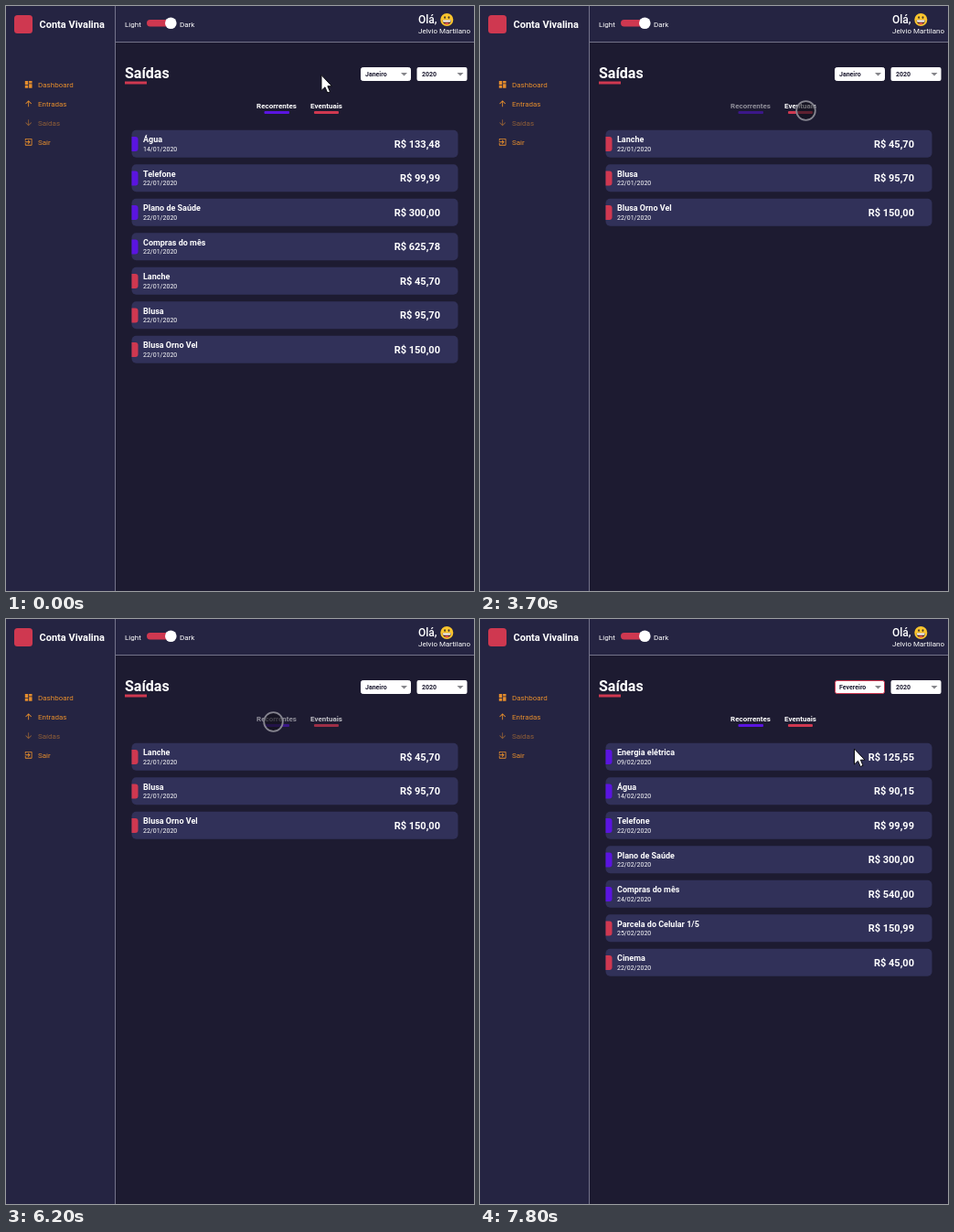
These frames come from a looping animation (512x640 px, 8 s). An HTML page:

```html
<!DOCTYPE html>
<html lang="pt-BR">
<head>
<meta charset="utf-8">
<title>Saídas</title>
<style>
html, body { margin: 0; width: 100%; height: 100%; overflow: hidden; background: #1d1b31; }
svg { display: block; width: 512px; height: 640px; font: 8px Roboto, sans-serif; fill: #fff; }
.b { font-weight: 700; }
.menu { fill: #e58d2c; }
.red { fill: #cf3850; }
.violet { fill: #5a14e0; }
.card { fill: #313159; }
.name { font: 700 9px Roboto, sans-serif; }
.date { font-size: 7px; }
.price { font: 700 11px Roboto, sans-serif; text-anchor: end; }
.select { font: 700 7px Roboto, sans-serif; fill: #1d1b31; }
.month { font: 500 14px Roboto, sans-serif; fill: #26253a; }
.tag { font-weight: 700; text-anchor: middle; }
</style>
</head>
<body>
<svg viewBox="0 0 512 640">
  <rect width="512" height="640" fill="#1d1b31"/>
  <path d="M0 0H512V39H120V640H0Z" fill="#252442"/>
  <path d="M119.5 0V640M120 39.5H512" stroke="#74738a"/>

  <rect class="red" x="9" y="10" width="20" height="20" rx="3.5"/>
  <text class="b" x="36.5" y="24" font-size="11">Conta Vivalina</text>
  <g id="menu" class="menu"></g>

  <text x="130" y="23">Light</text>
  <rect class="red" x="154" y="15" width="31" height="7.5" rx="3.7"/>
  <circle cx="180.3" cy="18.7" r="6.3"/>
  <text x="190" y="23">Dark</text>
  <text x="451" y="19" font-size="12" font-weight="500">Olá,</text>
  <g transform="translate(482.3 15)">
    <circle r="7" fill="#fbc52d"/>
    <ellipse cx="-2.2" cy="-2.4" rx=".9" ry="1.4" fill="#40332b"/>
    <ellipse cx="2.2" cy="-2.4" rx=".9" ry="1.4" fill="#40332b"/>
    <path d="M-4.8 .5H4.8A4.8 4.8 0 0 1 -4.8 .5Z" fill="#54342c"/>
    <path d="M-4.5 .6H4.5L3.9 2.5H-3.9Z"/>
    <ellipse cy="4.2" rx="2.3" ry="1" fill="#e9504a"/>
  </g>
  <text x="451" y="30">Jelvio Martilano</text>

  <text class="b" x="130" y="79" font-size="16">Saídas</text>
  <rect class="red" x="130" y="82.5" width="24" height="3"/>

  <rect id="box" x="388.5" y="67.5" width="54" height="14" rx="2"/>
  <rect x="449.5" y="67" width="55" height="15" rx="2"/>
  <text id="chosen" class="select" x="393" y="77"></text>
  <text class="select" x="455" y="77">2020</text>
  <path d="M432 73h7l-3.5 3.5zM493.5 73h7l-3.5 3.5z" fill="#85858a"/>

  <g id="recurrent" class="tag">
    <text x="296" y="112">Recorrentes</text>
    <rect class="violet" x="282.5" y="115" width="27.5" height="3" rx="1"/>
  </g>
  <g id="occasional" class="tag">
    <text x="350.5" y="112">Eventuais</text>
    <rect class="red" x="337" y="115" width="27" height="3" rx="1"/>
  </g>

  <g id="list"></g>
  <g id="empty">
    <rect class="card" x="137.5" y="148" width="357" height="74" rx="5"/>
    <text x="231" y="189" font-size="12">Nenhum registro encontrado</text>
    <g transform="translate(394 185)">
      <circle r="6.7" fill="#fbc52d"/>
      <circle cx="-2.6" cy="-1.5" r="1.3" fill="#40332b"/>
      <circle cx="2.6" cy="-1.5" r="1.3" fill="#40332b"/>
      <path d="M-3.5 2.2H3.5V4.2H-3.5Z" fill="#f3efe2"/>
      <path d="M-3.5 3.2H3.5" stroke="#6b5840" stroke-width=".7"/>
    </g>
  </g>

  <g id="popup"></g>
  <circle id="touch" stroke="#85848f" stroke-width="1.8"/>
  <path id="arrow" d="M0 0V17L4 13.3 6.7 19.5 9.5 18.3 6.9 12.2H11.5Z" stroke="#0b0b10"/>
</svg>
<script>
const $ = id => document.getElementById(id);

const icons = [
  ['Dashboard', 'M3 13h8V3H3v10zm0 8h8v-6H3v6zm10 0h8V11h-8v10zm0-18v6h8V3h-8z'],
  ['Entradas', 'M4 12l1.4 1.4L11 7.8V20h2V7.8l5.6 5.6L20 12l-8-8z'],
  ['Saídas', 'M20 12l-1.4-1.4L13 16.2V4h-2v12.2l-5.6-5.6L4 12l8 8z'],
  ['Sair', 'M10 15.6L11.5 17l5-5-5-5L10 8.4 12.6 11H3v2h9.6zM19 3H5a2 2 0 0 0-2 2v4h2V5h14v14H5v-4H3v4a2 2 0 0 0 2 2h14a2 2 0 0 0 2-2V5a2 2 0 0 0-2-2z']
];
$('menu').innerHTML = icons.map(([label, d], i) =>
  `<g opacity="${i == 2 ? .55 : 1}"><path transform="translate(19.5 ${80.6 + 21 * i}) scale(.43)" d="${d}"/>
  <text x="35" y="${89 + 21 * i}">${label}</text></g>`).join('');

const months = 'Janeiro Fevereiro Março Abril Maio Junho Julho Agosto Setembro Outubro Novembro Dezembro'.split(' ');
$('popup').innerHTML = '<rect x="388" y="82" width="111" height="386"/>' +
  '<rect x="388" y="114" width="111" height="32" fill="#c8c8c8"/>' +
  months.map((m, i) => `<text class="month" x="397" y="${103 + 32 * i}">${m}</text>`).join('');

// name | date | price, recurrent rows first
const parse = (month, recurrentCount, text) => text.split('\n').map((line, i) => {
  const [name, day, price] = line.trim().split('|');
  return { name, date: `${day}/${month}/2020`, price, color: i < recurrentCount ? 'violet' : 'red' };
});
const january = parse('01', 4, `Água|14|133,48
  Telefone|22|99,99
  Plano de Saúde|22|300,00
  Compras do mês|22|625,78
  Lanche|22|45,70
  Blusa|22|95,70
  Blusa Orno Vel|22|150,00`);
const february = parse('02', 5, `Energia elétrica|09|125,55
  Água|14|90,15
  Telefone|22|99,99
  Plano de Saúde|22|300,00
  Compras do mês|24|540,00
  Parcela do Celular 1/5|25|150,99
  Cinema|22|45,00`);
const occasional = january.slice(4);

// Baselines sit on whole pixels
function card({ name, date, price, color }, i) {
  const y = 37.5 * i;
  return `<rect class="card" x="137.5" y="${135.7 + y}" width="357" height="30" rx="5"/>
    <path class="${color}" d="M137.5 ${143 + y}h4a3 3 0 0 1 3 3v10a3 3 0 0 1-3 3h-4z"/>
    <text class="name" x="150" y="${Math.ceil(149 + y)}">${name}</text>
    <text class="date" x="150" y="${Math.floor(159 + y)}">${date}</text>
    <text class="price" x="475" y="${Math.floor(155 + y)}">R$ ${price}</text>`;
}

const ramp = (t, from, to) => Math.min(1, Math.max(0, (t - from) / (to - from)));

// Each move: start, end, x, y
const moves = [
  [400, 600, 344.5, 110.5], [700, 900, 318.5, 125], [1000, 1200, 289.5, 114.5], [3200, 3700, 356.5, 114.5],
  [5600, 6200, 292.5, 112.5], [6500, 6900, 401.3, 85.2], [7200, 7600, 409.5, 142]];
function pointer(t) {
  let x = 340, y = 77;
  for (const [from, to, toX, toY] of moves) {
    const p = ramp(t, from, to);
    x += (toX - x) * p;
    y += (toY - y) * p;
  }
  return [x, y];
}

// Each press lasts 100 ms, then its rows appear
const presses = [[2200, occasional], [4200, []], [5400, occasional], [6400, january]];
const opening = 7100, closing = 7800;

const show = (id, on) => $(id).setAttribute('visibility', on ? 'visible' : 'hidden');
const set = (id, attrs) => { for (const k in attrs) $(id).setAttribute(k, attrs[k]); };

let shown;
function draw(now) {
  const t = Math.floor(now % 8000 / 100) * 100;
  let rows = january;
  for (const [time, next] of presses) if (t > time) rows = next;
  if (t >= closing) rows = february;
  if (rows != shown) {
    shown = rows;
    $('list').innerHTML = rows.map(card).join('');
    show('empty', !rows.length);
  }

  set('recurrent', { opacity: 1 - .5 * ramp(t, 2200, 2800) + .22 * ramp(t, 6400, 6700) + .28 * ramp(t, 7100, 7600) });
  set('occasional', { opacity: 1 - .5 * ramp(t, 4200, 4500) + .22 * ramp(t, 5400, 6000) + .28 * ramp(t, 6400, 6700) });
  $('chosen').textContent = months[t < closing ? 0 : 1];
  set('box', { stroke: t < opening ? '#fff' : '#cf3850' });
  show('popup', t > opening && t < closing);

  const isArrow = t < 400 || t > 7200;
  const [x, y] = t < 400 ? [345, 75.5] : pointer(t);
  const pressed = t == opening || presses.some(p => t == p[0]);
  show('arrow', isArrow);
  show('touch', !isArrow);
  set('arrow', { transform: `translate(${x} ${y})` });
  set('touch', { cx: x, cy: y, r: pressed ? 14.5 : 10.3, fill: `rgba(18,16,26,${pressed ? .7 : .6})` });
  requestAnimationFrame(draw);
}
draw(0);
</script>
</body>
</html>
```
